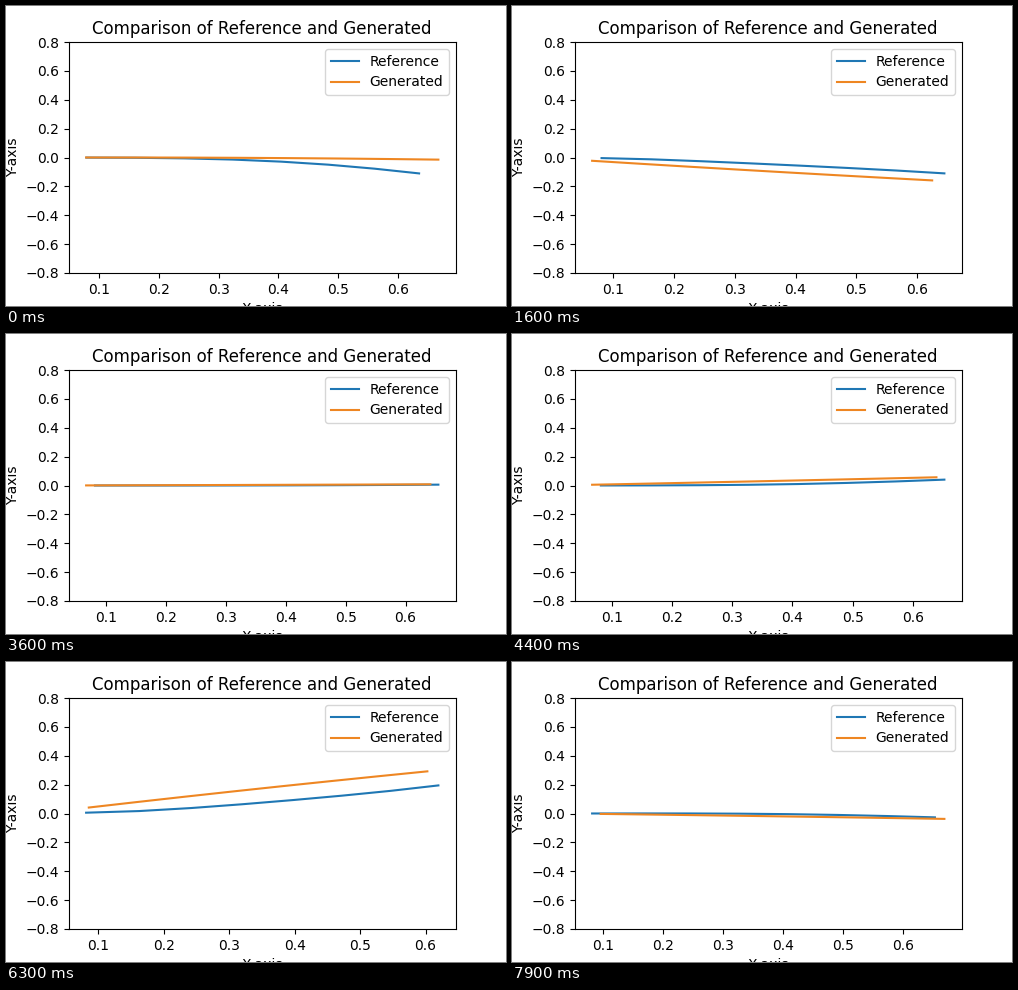
A matplotlib script for the animation above (8 s loop, 500 by 300 pixels).

```python
import numpy as np
import matplotlib.pyplot as plt
from matplotlib.animation import FuncAnimation

STEP = 100
FRAMES = 80
U = np.linspace(0, 1, 7)  # position of each link along a chain

# centre in ms and direction of each swing
SWINGS = ((715, -1), (5750, 1), (9330, -1))
WIDTH = 471

# drift of the generated chain's root: times, x
DRIFT_T = (0, 1600, 4400, 5200, 6300, 7900)
DRIFT_X = (.078, .066, .067, .061, .0856, .0958)


def swing(t):
    return sum(sign / np.cosh((t - mid) / WIDTH) for mid, sign in SWINGS)


def chain(x, y, angles, link):
    xs = x + link * np.append(0, np.cumsum(np.cos(angles)))
    ys = y + link * np.append(0, np.cumsum(np.sin(angles)))
    return xs, ys


def reference(t, settle):
    # the tip swings widest and first, the root follows
    lag = 620 * (1 - U) ** 2 - 120
    angles = (.14 + .916 * U) * swing(t - lag) * (1 - .25 * settle)
    return chain(.0815 - .003 * settle, .04 * angles[0], angles, .0819)


def generated(t, settle):
    lag = 32 * (1 - 2 * U)
    angles = .8 * swing(t - lag) * (1 - settle) - .05 * U * settle
    x = np.interp(t, DRIFT_T, DRIFT_X)
    y = .06 * swing(t - 120) * (1 - settle)
    return chain(x, y, angles, .0821 + .0022 * settle)


fig, ax = plt.subplots(figsize=(5, 3), dpi=100)
ref_line, = ax.plot([], [], label="Reference")
gen_line, = ax.plot([], [], color="#ee8622", label="Generated")
ax.set_title("Comparison of Reference and Generated")
ax.set_xlabel("X-axis")
ax.set_ylabel("Y-axis")
ax.set_ylim(-0.8, 0.8)
ax.legend(loc="upper right")


def update(i):
    t = i * STEP
    settle = np.exp(-t / 150)
    ref, gen = reference(t, settle), generated(t, settle)
    ref_line.set_data(*ref)
    gen_line.set_data(*gen)

    xs = np.concatenate([ref[0], gen[0]])
    margin = 0.05 * np.ptp(xs)
    ax.set_xlim(xs.min() - margin, xs.max() + margin)
    return ref_line, gen_line


anim = FuncAnimation(fig, update, frames=FRAMES, interval=STEP,
                     repeat=True, repeat_delay=0, blit=False)
plt.show()
```
